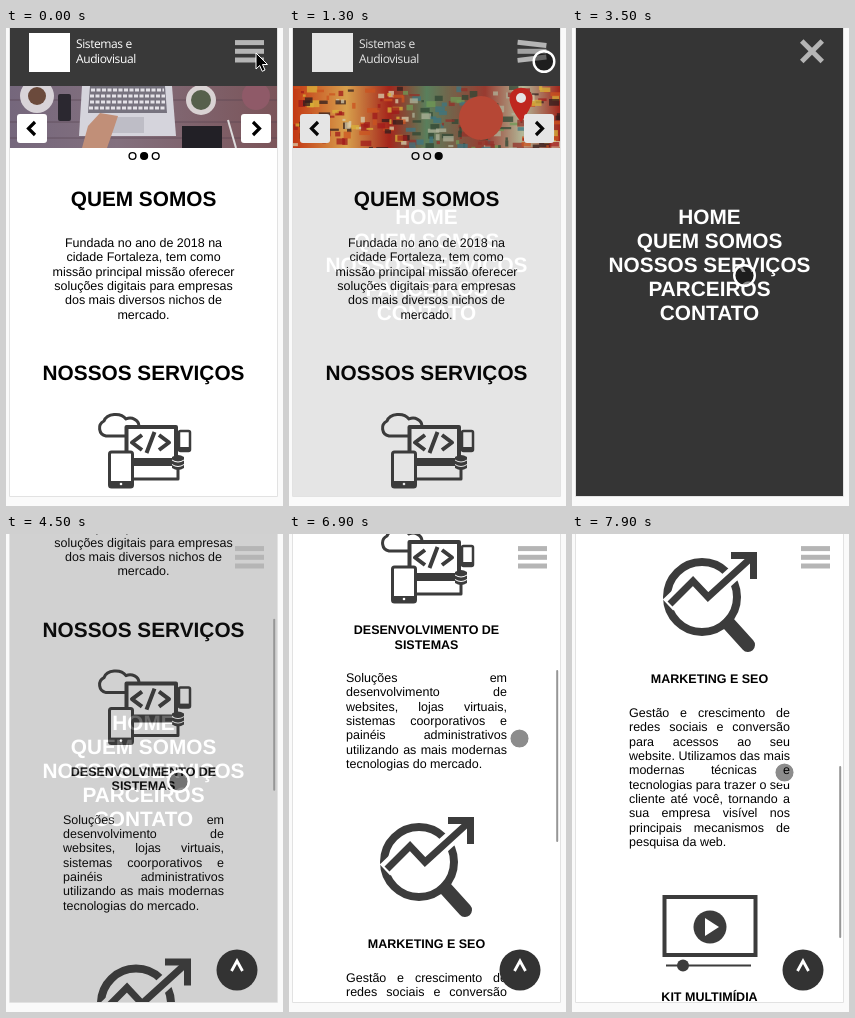
Recreate the animation shown at these times as an HTML page. Size 277 by 478 pixels, loop 8000 ms.

```html
<!DOCTYPE html>
<html lang="pt-BR">
<head>
<meta charset="utf-8">
<title>Site em celular</title>
<style>
  html, body { margin: 0; width: 100%; height: 100%; overflow: hidden; background: #fafafa; }
  svg { display: block; }
  text { font-family: "Liberation Sans", Arial, sans-serif; font-size: 12.5px; white-space: pre; text-rendering: geometricPrecision; }
  .center { text-anchor: middle; }
  .bold { font-weight: bold; }
  .big { font-weight: bold; font-size: 20.8px; }
  .brand { font-family: "Open Sans", sans-serif; font-size: 12px; letter-spacing: -.4px; fill: #fff; }
  .icon { fill: none; stroke: #3c3c3c; stroke-width: 4; stroke-linejoin: round; }
  .icon .solid { fill: #3c3c3c; stroke: none; }
  .icon .paper { fill: #fff; }
</style>
</head>
<body>
<svg width="277" height="478" viewBox="0 0 277 478">
  <rect width="277" height="478" fill="#fafafa"/>
  <path d="M3.5 0V468.5H271.5V0" fill="#fff" stroke="#e2e2e2"/>

  <svg x="4" width="267" height="468" viewBox="4 0 267 468">
    <g id="page">
      <rect x="4" width="267" height="58" fill="#393939"/>
      <rect x="23" y="5" width="41" height="39" fill="#fff"/>
      <text class="brand" x="70" y="20">Sistemas e</text>
      <text class="brand" x="70" y="35">Audiovisual</text>

      <svg x="4" y="58" width="267" height="62" viewBox="0 0 267 62">
        <g id="desk">
          <linearGradient id="wood">
            <stop offset="0" stop-color="#75677c"/><stop offset=".4" stop-color="#83707e"/>
            <stop offset="1" stop-color="#7b5459"/>
          </linearGradient>
          <rect width="267" height="62" fill="url(#wood)"/>
          <path d="M0 14H267M0 36H267M0 52H267" stroke="#54424f" stroke-opacity=".6"/>
          <circle cx="27" cy="10" r="17" fill="#d8d3d8"/>
          <circle cx="27" cy="10" r="9" fill="#6b4a3c"/>
          <path d="M72 0H162L166 50H69Z" fill="#d5d4dc"/>
          <path d="M80 0H155L157 27H78Z" fill="#77737f"/>
          <path d="M81 4H154M80 10H155M80 16H155M79 22H156" stroke="#e4e2e8" stroke-width="3" stroke-dasharray="4 1.500"/>
          <rect x="102" y="31" width="32" height="16" fill="#bebdc6"/>
          <path d="M72 62L78 40L90 27L108 30L104 42L97 62Z" fill="#c18f78"/>
          <rect x="48" y="8" width="13" height="27" rx="2" fill="#2b2830"/>
          <circle cx="191" cy="14" r="15" fill="#d9d2d3"/>
          <circle cx="191" cy="14" r="10" fill="#56604c"/>
          <rect x="172" y="40" width="40" height="24" fill="#222026"/>
          <path d="M218 34L226 62" stroke="#ddd" stroke-width="2"/>
          <circle cx="246" cy="10" r="14" fill="#8f5a68"/>
        </g>
        <g id="mural">
          <linearGradient id="paint">
            <stop offset="0" stop-color="#d8380f"/><stop offset=".2" stop-color="#efb050"/>
            <stop offset=".36" stop-color="#b52318"/><stop offset=".5" stop-color="#5f8a62"/>
            <stop offset=".72" stop-color="#a83c30"/><stop offset=".86" stop-color="#c5cba6"/>
            <stop offset="1" stop-color="#b02418"/>
          </linearGradient>
          <rect width="267" height="62" fill="url(#paint)"/>
          <g id="tiles"></g>
          <circle cx="188" cy="32" r="22" fill="#c94a35"/>
          <path d="M228 36Q214 18 217 9A12 12 0 0 1 239 9Q242 18 228 36Z" fill="#d3251c"/>
          <circle cx="228" cy="12" r="5" fill="#fff"/>
        </g>
      </svg>
      <g fill="#fff">
        <rect x="11" y="86" width="30" height="29" rx="3"/>
        <rect x="235" y="86" width="30" height="29" rx="3"/>
      </g>
      <path d="M29 94L22.500 100.500L29 107M247 94L253.500 100.500L247 107" fill="none" stroke="#000" stroke-width="3.200"/>
      <g id="dots" stroke="#000" stroke-width="1.400"></g>

      <g class="icon">
        <path d="M119 408H100A8 8 0 0 1 98 393A12 9 0 0 1 120 391A9 8 0 0 1 133 398" stroke-width="3"/>
        <path class="paper" d="M120.500 399H170V432H120.500Z"/>
        <path class="solid" d="M118 431H173V438H118Z"/>
        <path d="M126 451H172V436" stroke-width="3"/>
        <path d="M136 407L126 414.500L136 422M153 407L163 414.500L153 422M148.500 404L140.500 425"/>
        <rect class="paper" x="173" y="403" width="11" height="20" rx="1.500" stroke-width="2.500"/>
        <path class="solid" d="M173 419H184V423H173Z"/>
        <path class="solid" d="M166 429Q172 425 178 429V440Q172 444 166 440Z"/>
        <path d="M166 432Q172 436 178 432M166 436.500Q172 440.500 178 436.500" stroke="#fff" stroke-width="1"/>
        <rect class="paper" x="103.500" y="424" width="23" height="35" rx="2" stroke-width="3"/>
        <path class="solid" d="M103 453H127V459H103Z"/>
        <circle cx="115" cy="456" r="1.300" fill="#fff" stroke="none"/>
      </g>
      <g class="icon">
        <circle cx="130" cy="719" r="35" stroke-width="8"/>
        <path d="M157 746L176 767" stroke-width="14" stroke-linecap="round"/>
        <path d="M96 727L121 703L136 719L180 679" stroke="#fff" stroke-width="15"/>
        <g stroke-width="7" stroke-linejoin="miter">
          <path d="M98 726L121 703L136 719L180 679"/>
          <path d="M159 677.500H181.500V701"/>
        </g>
      </g>
      <g class="icon">
        <rect x="92.500" y="1019" width="91" height="58" stroke-linejoin="miter"/>
        <circle class="solid" cx="138" cy="1049" r="16.500"/>
        <path d="M133 1040L147 1049L133 1058Z" fill="#fff" stroke="none"/>
        <path d="M94 1087.500H179" stroke-width="2"/>
        <circle class="solid" cx="111" cy="1087.500" r="6"/>
      </g>
    </g>

    <g id="menu" fill="#fff"><rect x="4" width="267" height="468" fill="#353535"/></g>
    <g id="top">
      <circle cx="231" cy="436" r="20.500" fill="#333"/>
      <path d="M225.500 437L231 427L236.500 437" fill="none" stroke="#fff" stroke-width="2.800"/>
    </g>
    <rect id="scrollbar" x="267.200" width="2" height="172" rx="1" fill="#969696"/>
    <g id="bars" fill="#b5b5b5"></g>
  </svg>

  <path id="arrow" d="M250 25V41L253.700 37.500L256.200 43.300L259 42L256.500 36.500H261.500Z" fill="#000" stroke="#fff"/>
  <g id="touch">
    <circle r="9.500" fill="#000" fill-opacity=".45"/>
    <circle r="10.300" fill="none" stroke="#fff" stroke-width="2.400"/>
  </g>
</svg>

<script>
const LOOP = 8000, STEP = 100;
const CENTER = 137.5, COLUMN = 57, COLUMN_WIDTH = 161, SLIDE_WIDTH = 267;
const $ = id => document.getElementById(id);

function set(node, attrs) {
  for (const name in attrs) node.setAttribute(name, attrs[name]);
  return node;
}

function add(parent, tag, attrs, content = '') {
  const node = set(document.createElementNS('http://www.w3.org/2000/svg', tag), attrs);
  node.textContent = content;
  return parent.appendChild(node);
}

function centered(parent, y, pitch, style, lines) {
  lines.forEach((line, i) =>
    add(parent, 'text', { class: 'center ' + style, x: CENTER, y: y + i * pitch }, line));
}

// Spreads the words of every line but the last over the column.
function justified(y, lines) {
  lines.forEach((line, i) => {
    const node = add($('page'), 'text', { x: COLUMN, y: y + i * 14.35 }, line);
    if (i === lines.length - 1) return;
    const gaps = line.split(' ').length - 1;
    node.style.wordSpacing = (COLUMN_WIDTH - node.getComputedTextLength()) / gaps + 'px';
  });
}

const page = $('page');
centered(page, 178.3, 0, 'big', ['QUEM SOMOS']);
centered(page, 219, 14.35, '', ['Fundada no ano de 2018 na', 'cidade Fortaleza, tem como',
  'missão principal missão oferecer', 'soluções digitais para empresas',
  'dos mais diversos nichos de', 'mercado.']);
centered(page, 352.3, 0, 'big', ['NOSSOS SERVIÇOS']);
centered(page, 491, 14.7, 'bold', ['DESENVOLVIMENTO DE', 'SISTEMAS']);
justified(539, ['Soluções em', 'desenvolvimento de', 'websites, lojas virtuais,',
  'sistemas coorporativos e', 'painéis administrativos', 'utilizando as mais modernas',
  'tecnologias do mercado.']);
centered(page, 805, 0, 'bold', ['MARKETING E SEO']);
justified(839, ['Gestão e crescimento de', 'redes sociais e conversão',
  'para acessos ao seu', 'website. Utilizamos das mais', 'modernas técnicas e',
  'tecnologias para trazer o seu', 'cliente até você, tornando a', 'sua empresa visível nos',
  'principais mecanismos de', 'pesquisa da web.']);
centered(page, 1123, 0, 'bold', ['KIT MULTIMÍDIA']);
centered($('menu'), 195.5, 24.2, 'big',
  ['HOME', 'QUEM SOMOS', 'NOSSOS SERVIÇOS', 'PARCEIROS', 'CONTATO']);

for (let i = 0; i < 3; i++) {
  add($('dots'), 'circle', { cx: 126.5 + i * 11.6, cy: 128, r: 3.4 });
  add($('bars'), 'rect', { x: -14.5, y: -2.5, width: 29, height: 5 });
}

let seed = 7;
const random = () => (seed = seed * 16807 % 2147483647) / 2147483647;
const warm = ['#f0c53a', '#e2571c', '#b01717', '#efe3bd', '#2f1a1a'];
const cool = ['#2f4a35', '#78a85a', '#3e7f8c', '#c0c4a8', '#a03028'];
for (let i = 0; i < 260; i++) {
  const x = random() * SLIDE_WIDTH;
  const paints = x > 110 && x < 225 ? cool : warm;
  add($('tiles'), 'rect', {
    x, y: random() * 62, width: 2 + random() * 10, height: 2 + random() * 5,
    fill: paints[Math.floor(random() * paints.length)], opacity: .75
  });
}

const part = (time, start, end) => Math.min(1, Math.max(0, (time - start) / (end - start)));
const swing = (time, start, end) => (1 - Math.cos(Math.PI * part(time, start, end))) / 2;
const place = (node, x, y, turn = 0) =>
  set(node, { transform: `translate(${x} ${y}) rotate(${turn})` });

const moves = [
  { start: 2100, end: 2200, x: 219, y: 72 },
  { start: 2300, end: 3200, x: 156.5, y: 244.5 },
  { start: 3300, end: 3500, x: 172.5, y: 247.5 },
  { start: 5300, end: 5500, x: 163.5, y: 239.5 },
  { start: 5600, end: 6000, x: 212, y: 190 },
  { start: 6000, end: 6200, x: 230.5, y: 204.5 },
  { start: 7000, end: 7900, x: 212.5, y: 238.5 }
];

function touchAt(time) {
  let x = 255, y = 33.5;
  for (const move of moves) {
    const p = part(time, move.start, move.end);
    x += (move.x - x) * p;
    y += (move.y - y) * p;
  }
  return [x, y];
}

function draw(time) {
  const slide = swing(time, 250, 900);
  const jump = swing(time, 4226, 4626);
  const menu = swing(time, 1210, 1610) - jump;
  const cross = swing(time, 1200, 1600) - swing(time, 4200, 4500);
  const scroll = 322 * jump + 69 * swing(time, 6400, 6900) + 265 * swing(time, 7000, 7900);
  const bar = part(time, 4200, 4300) - part(time, 4800, 5200) + part(time, 6400, 6500);
  const touching = time >= 300;

  place(page, 0, -scroll);
  place($('desk'), -SLIDE_WIDTH * slide, 0);
  place($('mural'), SLIDE_WIDTH * (1 - slide), 0);
  [...$('dots').children].forEach((dot, i) =>
    set(dot, { fill: i === (touching ? 2 : 1) ? '#000' : '#fff' }));

  set($('menu'), { opacity: menu });
  [...$('bars').children].forEach((stripe, i) => {
    const side = i - 1;
    place(stripe, 243.5 - 3.5 * cross, 23.3 + side * 8.7 * (1 - cross), -45 * side * cross);
    set(stripe, { opacity: side ? 1 : 1 - cross });
  });

  set($('top'), { opacity: scroll > 100 ? 1 : 0 });
  set($('scrollbar'), { y: .362 * scroll - 5.5, opacity: bar });
  set($('arrow'), { opacity: touching ? 0 : 1 });
  set($('touch'), { opacity: touching ? 1 : 0 });
  place($('touch'), ...touchAt(time));
}

// The picture advances ten times a second.
function tick() {
  draw(Math.floor(performance.now() % LOOP / STEP) * STEP);
  requestAnimationFrame(tick);
}
tick();
</script>
</body>
</html>
```
